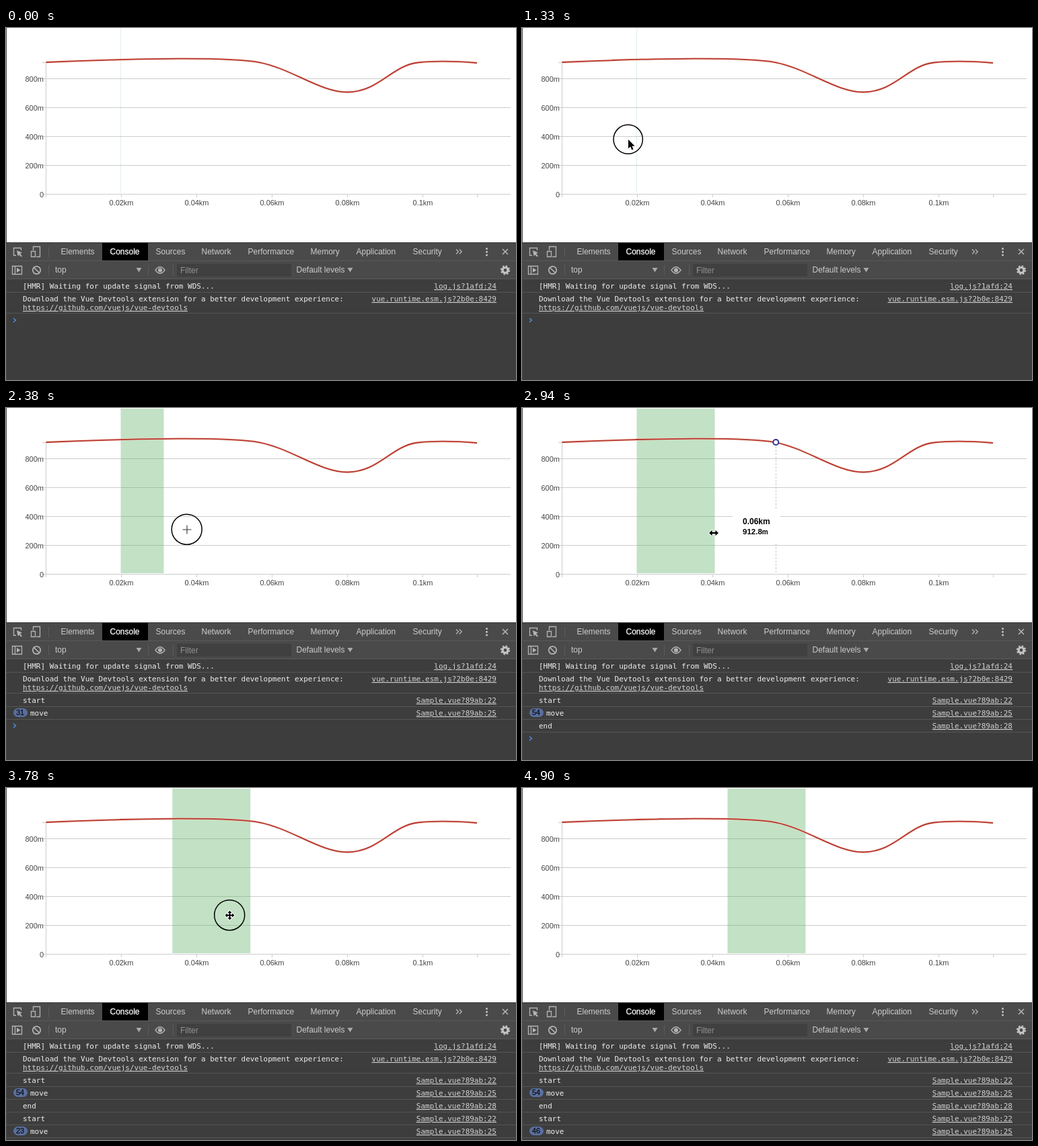
Write an HTML page that moves like this. It is 758 px wide and 524 px high and loops after 4.97 s.

```html
<!DOCTYPE html>
<html lang="en">
<head>
<meta charset="utf-8">
<title>Chart brush</title>
<style>
  html, body { margin: 0; width: 100%; height: 100%; overflow: hidden; background: #fff; }
  svg { display: block; width: 758px; height: 524px; }
  text { font: 12px "Liberation Sans", Arial, sans-serif; white-space: pre; }
  .axis text { font-size: 11px; fill: #444; }
  .axis path { stroke: #ccc; fill: none; }
  .tabs text { fill: #ccc; }
  .log text { font: 11px "DejaVu Sans Mono", monospace; fill: #eee; }
  .log .link { fill: #d2d2d2; text-decoration: underline; }
  .log .count { font: 11px "Liberation Sans", Arial, sans-serif; fill: #111; stroke: #111; stroke-width: .3; }
  .log path { stroke: #555; }
  .icon { fill: none; stroke: #b4b4b4; stroke-width: 1.3; }
  .tip text { font-weight: bold; fill: #000; }
  .cursor { fill: #000; stroke: #fff; stroke-linejoin: round; paint-order: stroke; stroke-width: 2; }
</style>
</head>
<body>
<svg viewBox="0 0 758 524">
  <rect width="758" height="524" fill="#fff"/>
  <g class="axis" id="axis"></g>
  <rect id="brush" y="1" height="245" fill="rgb(88,172,94)" fill-opacity=".36"/>
  <path id="pointer" d="M377.5 57V247" stroke="#bbb" stroke-opacity=".75" stroke-dasharray="3 2"/>
  <path d="M59.5 51C165 46 330 42 377 51.3C424 60.5 467 95.5 507 95.5C554 95.5 573 56 612 51.5C640 48.5 672 49.7 700 52"
        fill="none" stroke="#f3c9b4" stroke-width="3.4" stroke-opacity=".6"/>
  <path d="M59.5 51C165 46 330 42 377 51.3C424 60.5 467 95.5 507 95.5C554 95.5 573 56 612 51.5C640 48.5 672 49.7 700 52"
        fill="none" stroke="#b8342c" stroke-width="1.8"/>
  <g class="tip" id="tip">
    <circle cx="377.3" cy="51" r="4" fill="#fff" stroke="#30348c" stroke-width="2"/>
    <g id="tipBox">
      <rect width="71" height="50" rx="4" fill="#fff"/>
      <text x="15" y="22">0.06km</text>
      <text x="15" y="37" style="font-size:11.5px">912.8<tspan font-size="10">m</tspan></text>
    </g>
  </g>

  <rect y="319" width="758" height="205" fill="#3d3d3d"/>
  <rect y="319" width="758" height="54" fill="#4a4a4a"/>
  <path d="M0 319.5H758" stroke="#3c3c3c"/>
  <path d="M0 346.5H758M0 373.5H758" stroke="#5a5a5a"/>
  <rect x="143" y="320" width="68" height="26" fill="#000"/>
  <g class="tabs" id="tabs"></g>

  <g class="icon">
    <path d="M63.5 326V341M63.5 353V368M211.5 353V368M248.5 353V368" stroke="#5c5c5c" stroke-width="1"/>
    <path d="M22.5 331V327.5H11.5V338.5H15"/>
    <path d="M16 331L24 334.5L21 336L24 339.5L22.5 340.8L19.5 337.5L17.8 340Z" fill="#b4b4b4" stroke="none"/>
    <path d="M40.5 331V325.5H50.5V340.5H45M37.5 332.5H43.5V340.5H37.5Z"/>
    <path d="M669 329.5L672.5 333L669 336.5M673.8 329.5L677.3 333L673.8 336.5"/>
    <path d="M738 329L746 337M746 329L738 337" stroke-width="1.6"/>
    <path d="M9.5 354.5H23.5V366.5H9.5ZM13.5 354.5V366.5"/>
    <path d="M16 357L21.5 360.5L16 364Z" fill="#b4b4b4" stroke="none"/>
    <circle cx="45.5" cy="360.5" r="5.7" stroke-width="1.7"/>
    <path d="M41.5 356.5L49.5 364.5" stroke-width="1.7"/>
    <path d="M222 360.5Q229 351 236 360.5Q229 370 222 360.5Z"/>
    <circle cx="229" cy="360.5" r="2.4" fill="#b4b4b4"/>
    <circle cx="742" cy="360.5" r="4" stroke="#c4c4c4" stroke-width="3.2"/>
    <circle cx="742" cy="360.5" r="6.2" stroke="#c4c4c4" stroke-width="2" stroke-dasharray="2.4 2.47"/>
    <g fill="#c4c4c4" stroke="none">
      <circle cx="714.5" cy="328.5" r="1.5"/><circle cx="714.5" cy="333.3" r="1.5"/><circle cx="714.5" cy="338.1" r="1.5"/>
      <path d="M193.5 357H201.5L197.500 363.500ZM507.500 357H515.500L511.500 363.500Z" fill="#aaa"/>
    </g>
  </g>
  <rect x="254" y="351" width="170" height="19" fill="#404040"/>
  <text x="259" y="365" fill="#929292">Filter</text>

  <g class="log" id="log"></g>
  <path id="prompt" d="M11 432L14.500 435L11 438" fill="none" stroke="#4f8fe0" stroke-width="1.500"/>
  <rect width="1" height="524" fill="#4a4a4a"/>

  <circle id="ring" fill="none" stroke="#000" stroke-width="1.500"/>
  <g id="pointerIcon">
    <path class="cursor" data-kind="arrow" d="M0 0V13.500L3.100 10.600L5.300 15.500L7.500 14.500L5.400 9.800H9.600Z"/>
    <path data-kind="cross" d="M-6.500 0H6.500M0 -6.500V6.500" stroke="#333" stroke-width="1.100"/>
    <path class="cursor" data-kind="resize" d="M-7 0L-2.500 -4.300V-1.200H2.500V-4.300L7 0L2.500 4.300V1.200H-2.500V4.300Z"/>
    <path class="cursor" data-kind="move" d="M0 -7L3 -3.600H1V-1H3.600V-3L7 0L3.600 3V1H1V3.600H3L0 7L-3 3.600H-1V1H-3.600V3L-7 0L-3.600 -3V-1H-1V-3.600H-3Z"/>
  </g>
</svg>

<script>
const LOOP = 4970, STEP = 70;
const el = id => document.getElementById(id);
const show = (node, on) => node.style.display = on ? '' : 'none';
const set = (node, attrs) => Object.entries(attrs).forEach(([k, v]) => node.setAttribute(k, v));
const label = (x, y, text, extra = '') => `<text x="${x}" y="${y}" ${extra}>${text}</text>`;
const END = 'text-anchor="end"', MID = 'text-anchor="middle"';

// Piecewise linear track: each key is [time, value, value...].
function track(keys, t) {
  const i = keys.findIndex(k => k[0] > t);
  if (i === 0) return keys[0].slice(1);
  if (i < 0) return keys[keys.length - 1].slice(1);
  const a = keys[i - 1], b = keys[i], u = (t - a[0]) / (b[0] - a[0]);
  return a.slice(1).map((v, n) => v + (b[n + 1] - v) * u);
}

function buildAxis() {
  let out = '<path d="M59.5 51V252M54 51.5H59"/>';
  [800, 600, 400, 200, 0].forEach((v, i) => {
    const y = Math.round(75 + i * 42.9);
    out += `<path d="M54 ${y + .5}H750"/>` + label(56, y + 4.5, v ? v + 'm' : 0, END);
  });
  ['0.02', '0.04', '0.06', '0.08', '0.1'].forEach((v, i) => {
    const x = 171.5 + i * 112;
    out += `<path d="M${x} 247V252"/>` + label(x, 263.5, v + 'km', MID);
  });
  el('axis').innerHTML = out + '<path d="M700.5 247V252"/>';
}

function buildTabs() {
  const tabs = { Elements: 81.5, Sources: 222.5, Network: 290.5, Performance: 359.5,
                 Memory: 452.5, Application: 520.5, Security: 604.5 };
  el('tabs').innerHTML = Object.entries(tabs).map(([name, x]) => label(x, 337, name)).join('') +
    label(154.5, 337, 'Console', 'style="fill:#fff;stroke:#fff;stroke-width:.25"') +
    label(73, 364, 'top') + label(431.5, 364, 'Default levels');
}

const line = y => `<path d="M1 ${y}.5H758"/>`;
const link = (y, text) => label(729, y, text, `class="link" ${END}`);

function buildLog() {
  const entries = [['start', 22], ['move', 25], ['end', 28], ['start', 22], ['move', 25]];
  el('log').innerHTML =
    label(25, 388, '[HMR] Waiting for update signal from WDS...') + link(388, 'log.js?1afd:24') + line(393) +
    label(25, 407, 'Download the Vue Devtools extension for a better development experience:') +
    link(407, 'vue.runtime.esm.js?2b0e:8429') +
    label(25, 420, 'https://github.com/vuejs/vue-devtools', 'class="link"') + line(424) +
    entries.map(([name, row], i) => {
      const y = 439 + 19 * i;
      const badge = name === 'move'
        ? `<rect x="11" y="${y - 11}" height="13" rx="6.5" fill="#596f9f"/>` + label(15, y - 1, '', 'class="count"') : '';
      return `<g class="entry">${badge}${label(25, y, name, 'class="name"')}${link(y, 'Sample.vue?89ab:' + row)}${line(y + 5)}</g>`;
    }).join('');
}

buildAxis();
buildTabs();
buildLog();
const entries = [...document.querySelectorAll('.entry')];
const cursors = [...document.querySelectorAll('[data-kind]')];

const entryTimes = [1540, 1610, 2730, 3500, 3500];
const cursorPath = [[980, 185, 524], [1190, 159, 172], [1330, 158, 166], [1470, 168, 169], [1960, 219, 175],
  [2380, 269, 181], [2590, 285, 186], [2940, 285, 186], [3220, 240, 187], [3430, 230, 187], [3570, 301, 188],
  [3850, 343, 190], [4060, 361, 193], [4340, 361, 193], [4830, 375, 522]];
const brushRight = [[1540, 171], [2380, 234.5], [2730, 286.5]];
const brushShift = [[3430, 0], [3570, 33], [4060, 135]];
const moveCounts = [[[1610, 1], [2380, 31], [2730, 54]], [[3500, 1], [3570, 5], [4060, 46]]];
const presses = [[1190, 2660], [3478, 4060]];
const cursorKinds = [[0, 'arrow'], [1400, 'cross'], [2660, 'resize'], [3010, 'move'], [4440, 'cross'], [4550, 'arrow']];

function setCount(entry, count) {
  const wide = count > 9;
  set(entry.querySelector('rect'), { width: wide ? 21 : 15 });
  entry.querySelector('.count').textContent = count;
  set(entry.querySelector('.name'), { x: wide ? 36 : 30 });
}

function ringRadius(t) {
  const press = presses.find(([down, up]) => t > down && t < up + 140);
  if (!press) return 0;
  const grow = Math.min(1, (t - press[0]) / 210);
  const shrink = Math.max(0, (t - press[1]) / 140);
  return 22.5 * (1 - (1 - grow) ** 3) * (1 - shrink);
}

function render(t) {
  const [shift] = track(brushShift, t), [right] = track(brushRight, t);
  set(el('brush'), { x: 170.5 + shift, width: Math.max(0, right - 170.5) });

  entries.forEach((entry, i) => show(entry, t >= entryTimes[i]));
  const rows = entryTimes.filter(time => t >= time).length;
  set(el('prompt'), { transform: `translate(0 ${19 * rows})` });
  [entries[1], entries[4]].forEach((entry, i) => setCount(entry, Math.round(track(moveCounts[i], t)[0])));

  const [x, y] = track(cursorPath, t);
  const hovering = (t >= 2800 && t < 3430) || (t >= 4130 && t < 4480);
  show(el('tip'), hovering);
  show(el('pointer'), hovering);
  set(el('tipBox'), { transform: `translate(${x + 28} ${y - 35})` });

  const visible = t >= 980 && t < 4900;
  const kind = cursorKinds.filter(([time]) => t >= time).pop()[1];
  cursors.forEach(c => show(c, visible && c.dataset.kind === kind));
  set(el('pointerIcon'), { transform: `translate(${x} ${y})` });

  const r = ringRadius(t);
  show(el('ring'), r > 0);
  set(el('ring'), { cx: x - .3, cy: y - .3, r });
}

const started = performance.now();
function frame() {
  const t = (performance.now() - started) % LOOP;
  render(Math.floor(t / STEP) * STEP);
  requestAnimationFrame(frame);
}
frame();
</script>
</body>
</html>
```
